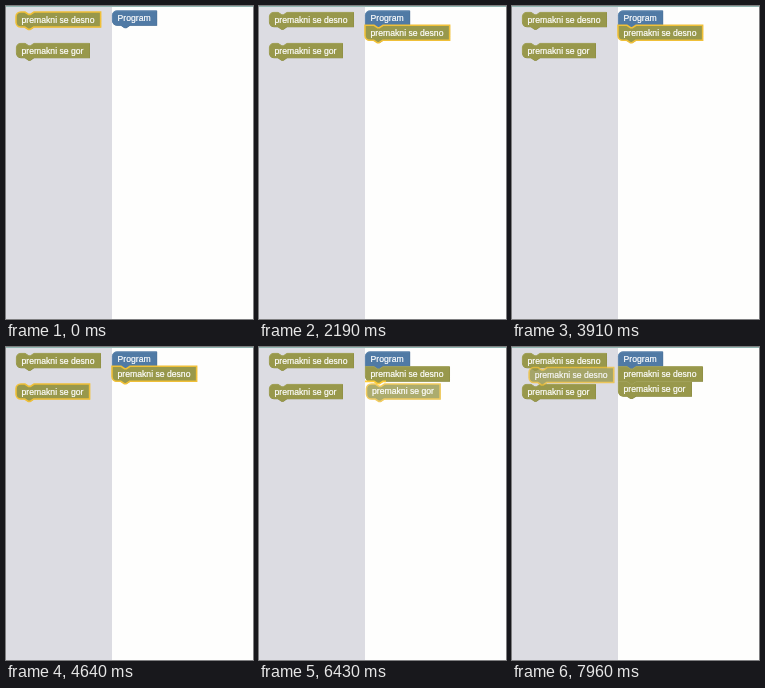
An HTML page that plays this animation: 247x313 px, repeating every 8000 ms.

```html
<!DOCTYPE html>
<html lang="sl">
<head>
<meta charset="utf-8">
<title>Zlaganje blokov</title>
<style>
  html, body { margin: 0; width: 100%; height: 100%; overflow: hidden; background: #fff; }
  svg { display: block; }
  text { font: 14.4px "Liberation Sans", Arial, sans-serif; fill: #fff; stroke: #fff; stroke-width: .35; }
  .light { fill: none; stroke: var(--light); stroke-width: 1; }
  .selected .body { stroke: #f0c038; stroke-width: 2.6; }
  .selected .light { display: none; }
  .dragging { opacity: .8; }
</style>
</head>
<body>
<svg id="stage" width="247" height="313" viewBox="0 0 247 313">
  <rect width="247" height="313" fill="#fefefd"/>
  <rect width="106" height="313" fill="#dcdce2"/>
  <rect width="247" height="1" fill="#8fb5b0"/>
</svg>
<script>
const SVG_NS = "http://www.w3.org/2000/svg";
const LOOP = 8000, SCALE = 0.6;
const OLIVE = { fill: "#98984b", light: "#a9a966", dark: "#84843c" };
const BLUE = { fill: "#507aa5", light: "#6f93b8", dark: "#42668a" };
const stage = document.getElementById("stage");

function add(parent, tag, attributes) {
  const node = document.createElementNS(SVG_NS, tag);
  for (const key in attributes) node.setAttribute(key, attributes[key]);
  return parent.appendChild(node);
}

// Puzzle block: top notch, bottom tab, corners rounded where nothing is attached.
function outline(width, { notch, roundTop, roundBottom }) {
  return (roundTop ? "M0,8A8,8 0 0 1 8,0" : "M0,0") +
    (notch ? "H15l6,4 3,0 6,-4" : "") + `H${width}V25H29.5l-6,4 -3,0 -6,-4` +
    (roundBottom ? "H8a8,8 0 0 1 -8,-8Z" : "H0Z");
}

function makeBlock(label, color, notch = true) {
  const group = add(stage, "g", { style: `--light:${color.light}` });
  const shadow = add(group, "path", { fill: color.dark, transform: "translate(.6 .6)" });
  const body = add(group, "path", { class: "body", fill: color.fill });
  const light = add(group, "path", { class: "light" });
  const text = add(group, "text", { x: 9.3, y: 17.5 });
  text.textContent = label;
  const width = text.getComputedTextLength() + 19.5;
  return {
    set({ x, y, selected = false, dragging = false, visible = true, roundTop = true, roundBottom = true }) {
      group.style.display = visible ? "" : "none";
      group.setAttribute("transform", `translate(${x} ${y}) scale(${SCALE})`);
      group.setAttribute("class", (selected ? "selected " : "") + (dragging ? "dragging" : ""));
      const d = outline(width, { notch, roundTop, roundBottom });
      shadow.setAttribute("d", d);
      body.setAttribute("d", d);
      light.setAttribute("d", `M.5,${roundBottom ? 17 : 24.5}V${roundTop ? 8 : .5}` +
        (roundTop ? "A7.5,7.5 0 0 1 8,.5" : "") +
        (notch ? "H15l6,4 3,0 6,-4" : "") + `H${width - .5}`);
    }
  };
}

const RIGHT = "premakni se desno", UP = "premakni se gor";
const menuRight = makeBlock(RIGHT, OLIVE);
const menuUp = makeBlock(UP, OLIVE);
const program = makeBlock("Program", BLUE, false);
const firstRight = makeBlock(RIGHT, OLIVE);
const firstUp = makeBlock(UP, OLIVE);
const nextRight = makeBlock(RIGHT, OLIVE);
const joint = add(stage, "path", {
  d: "M0,0H15l6,4 3,0 6,-4H35", fill: "none", stroke: "#fc3", "stroke-width": 3
});

// Drag keys: [time, x, y]; the block snaps into place after the last one.
const dragRight = [[760, 10, 6], [960, 17, 21], [1260, 64.5, 30], [1600, 104, 25], [1860, 109, 22]];
const dragUp = [[5240, 10, 37], [5560, 35, 40], [5900, 80, 40], [6200, 106, 38], [6430, 107.5, 37], [6700, 107.5, 36]];
const dragNext = [[7760, 10, 6], [7960, 17, 20.5], [8000, 20, 22]];

function along(keys, t) {
  let i = 0;
  while (i < keys.length - 2 && t > keys[i + 1][0]) i++;
  const [from, to] = [keys[i], keys[i + 1]];
  const p = Math.min(1, Math.max(0, (t - from[0]) / (to[0] - from[0])));
  return { x: from[1] + (to[1] - from[1]) * p, y: from[2] + (to[2] - from[2]) * p };
}

function drag(block, keys, t, home) {
  const start = keys[0][0], end = keys.at(-1)[0];
  const dragging = t < end;
  const place = dragging ? along(keys, t) : home;
  block.set({ ...place, visible: t >= start, dragging, selected: dragging || home.selected });
  if (t >= start && dragging && Math.hypot(place.x - home.x, place.y - home.y) < 12) {
    joint.style.display = "";
    joint.setAttribute("transform", `translate(${home.x} ${home.y}) scale(${SCALE})`);
  }
}

function draw(t) {
  const rightPlaced = t >= 1860, upPlaced = t >= 6700;
  joint.style.display = "none";
  menuRight.set({ x: 10, y: 6, selected: t < 760 || (t >= 7300 && t < 7760) });
  menuUp.set({ x: 10, y: 37, selected: t >= 4300 && t < 5240 });
  program.set({ x: 106, y: 4.5, roundBottom: !rightPlaced });
  drag(firstRight, dragRight, t, {
    x: 106, y: 19.3, roundTop: false, roundBottom: !upPlaced, selected: t < 5240
  });
  drag(firstUp, dragUp, t, { x: 106, y: 34.3, roundTop: false, selected: t < 7760 });
  drag(nextRight, dragNext, t, { x: 106, y: 49.3 });
}

function tick() {
  draw(performance.now() % LOOP);
  requestAnimationFrame(tick);
}
tick();
</script>
</body>
</html>
```
